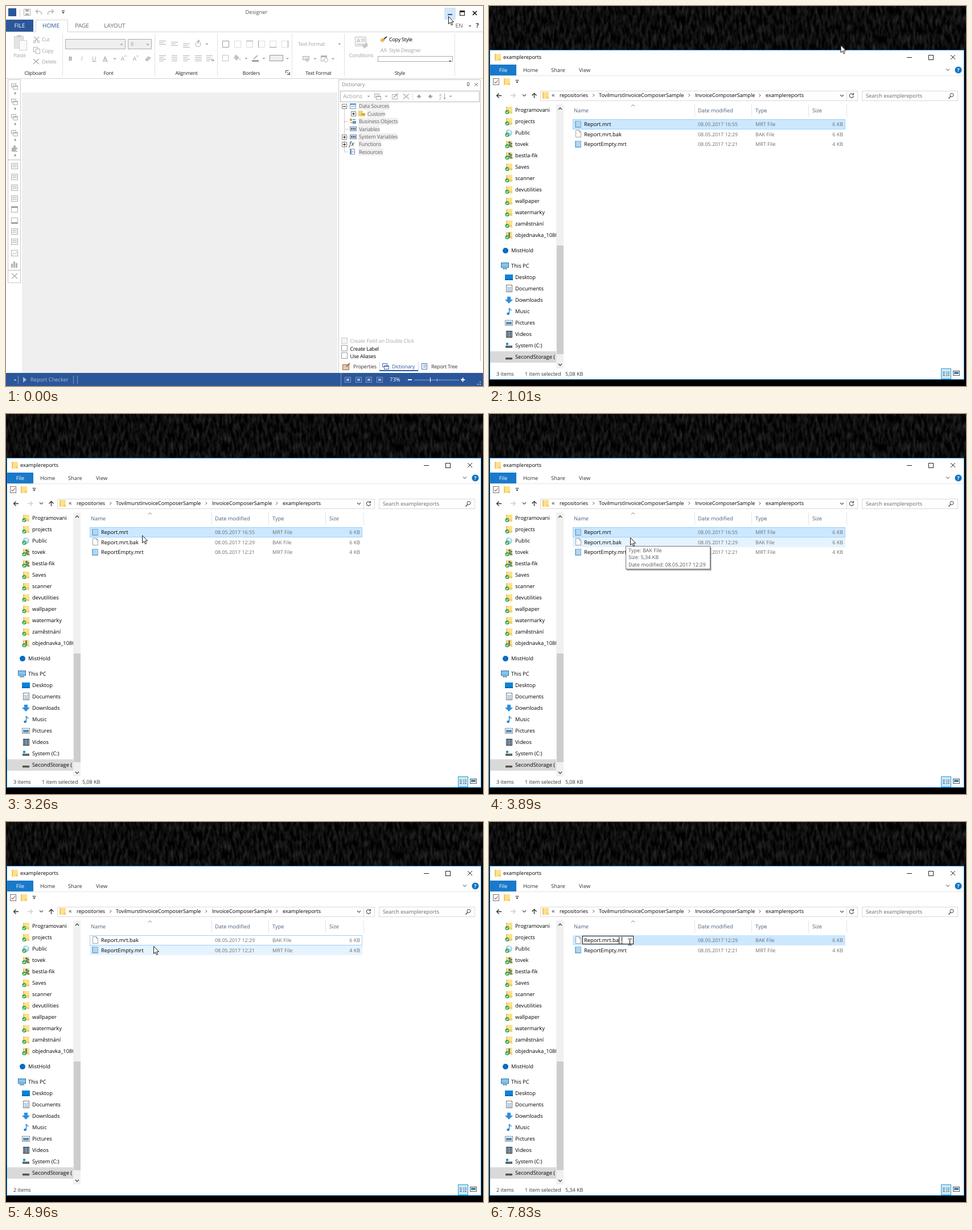
Write an HTML page that moves like this. It is 838 px wide and 668 px high and loops after 7.99 s.

```html
<!DOCTYPE html>
<html lang="en">
<head>
<meta charset="utf-8">
<title>Renaming a backup file</title>
<style>
html, body { margin: 0; width: 100%; height: 100%; overflow: hidden; background: #000; }
svg { position: absolute; left: 0; top: 0; width: 838px; height: 668px; overflow: hidden; }
text { font-family: "Open Sans", "Noto Sans", sans-serif; text-rendering: geometricPrecision; white-space: pre; }
#desk { will-change: transform; }
#win { overflow: visible; transform-origin: 0 0; }
#win .ui { letter-spacing: -.25px; }

/* Every animation shares one 7990 ms clock. */
#win, .pre, .post, #hover, #hoverTop, #sel, #picked, #edit, #field, #marked, #full, #gap, #short, #arrow, #beam {
  animation: 7990ms step-end infinite;
}
#win { animation-name: minimise; }
.pre { animation-name: pre; }
.post { animation-name: post; }
#hover { animation-name: hover; }
#hoverTop { animation-name: hover-top; }
#sel { animation-name: sel; }
#picked { animation-name: picked; }
#edit, #beam { animation-name: edit; }
#field { animation-name: field; }
#marked { animation-name: marked; }
#full { animation-name: full; }
#gap { animation-name: gap; }
#short { animation-name: short; }
#arrow { animation-name: arrow; }
#tip { animation: tip 7990ms linear infinite; }
#mover { animation: move 7990ms linear infinite; }

@keyframes minimise {
  0% { opacity: 1; transform: none; }
  6.88% { opacity: .85; transform: translate(1px, 52px) scale(.94); }
  7.76% { opacity: .55; transform: translate(4px, 183px) scale(.788); }
  9.01% { opacity: .14; transform: translate(8px, 350px) scale(.62); }
  9.89%, to { opacity: 0; transform: translate(12px, 480px) scale(.5); }
}
@keyframes pre { 0% { visibility: visible; } 53.44%, to { visibility: hidden; } }
@keyframes post { 0% { visibility: hidden; } 53.44%, to { visibility: visible; } }
@keyframes hover {
  0% { visibility: hidden; } 21.9% { visibility: visible; }
  28.29% { visibility: hidden; } 41.68% { visibility: visible; }
  63.2%, to { visibility: hidden; }
}
@keyframes hover-top { 0% { visibility: hidden; } 63.2% { visibility: visible; } 66.08%, to { visibility: hidden; } }
@keyframes sel {
  0% { visibility: hidden; stroke: #99d1ff; }
  66.08% { visibility: visible; stroke: #99d1ff; }
  82.6%, to { visibility: visible; stroke: #cce8ff; }
}
@keyframes picked { 0% { visibility: hidden; } 69.34%, to { visibility: visible; } }
@keyframes edit { 0% { visibility: hidden; } 82.6%, to { visibility: visible; } }
@keyframes field { 0% { width: 95px; } 98%, to { width: 89px; } }
@keyframes marked { 0% { opacity: 1; } 89.11%, to { opacity: 0; } }
@keyframes full { 0% { opacity: 0; } 89.11% { opacity: 1; } 98%, to { opacity: 0; } }
@keyframes gap { 0% { opacity: 0; } 95.12%, to { opacity: 1; } }
@keyframes short { 0% { opacity: 0; } 98%, to { opacity: 1; } }
@keyframes arrow { 0% { visibility: visible; } 82.6%, to { visibility: hidden; } }
@keyframes tip { 0%, 46.06% { opacity: 0; } 47.81%, 57.32% { opacity: 1; } 58.82%, to { opacity: 0; } }
@keyframes move {
  0%, .88% { transform: translate(777px, 18px); }
  2.13%, 9.89% { transform: translate(778.5px, 17px); animation-timing-function: ease-in-out; }
  16.52% { transform: translate(330px, 160px); }
  19.4% { transform: translate(262px, 200px); }
  21.9% { transform: translate(235px, 218px); }
  23.28%, 28.29% { transform: translate(228px, 225px); }
  29.16%, 39.92% { transform: translate(238px, 215px); }
  40.8% { transform: translate(239px, 213px); }
  42.55% { transform: translate(242px, 217px); }
  48.69%, 57.32% { transform: translate(248px, 217px); }
  62.08% { transform: translate(259px, 218px); }
  63.2% { transform: translate(258px, 214px); }
  64.08%, 78.4% { transform: translate(257px, 211px); }
  78.6%, 80.48% { transform: translate(257px, 212px); }
  80.6%, to { transform: translate(248px, 210px); }
}
</style>
</head>
<body>
<svg id="desk">
  <filter id="grunge" x="0" y="0" width="1" height="1" color-interpolation-filters="sRGB">
    <feTurbulence type="fractalNoise" baseFrequency=".2 .06" numOctaves="4" seed="7"/>
    <feColorMatrix values=".3 0 0 0 -.1  .3 0 0 0 -.1  .3 0 0 0 -.1  0 0 0 0 1"/>
  </filter>
  <rect width="838" height="78" filter="url(#grunge)"/>
</svg>
<svg id="files"></svg>
<svg id="win"></svg>
<svg id="pointer">
  <g id="mover"><path id="arrow" d="M.5.5V13.5L3.5 10.7 5.6 15.6 7.6 14.7 5.6 10H9.6Z" fill="#fff" stroke="#000" stroke-width=".9"/></g>
  <path id="beam" d="M244.5 205.5h2l1 1 1-1h2M247.5 206.5v9M244.5 216.5h2l1-1 1 1h2" fill="none" stroke="#000"/>
</svg>
<script>
// Baselines sit on whole pixels to keep small text crisp.
const text = (x, y, s, fill = '#000', size = 9.3, more = '') =>
  `<text x="${x}" y="${Math.round(y + 3.4)}" fill="${fill}" font-size="${size}" ${more}>${s}</text>`;
const rect = (x, y, w, h, fill, more = '') =>
  `<rect x="${x}" y="${y}" width="${w}" height="${h}" fill="${fill}" ${more}/>`;
const box = (x, y, w, h, stroke, fill = 'none', more = '') =>
  rect(x + .5, y + .5, w - 1, h - 1, fill, `stroke="${stroke}" ${more}`);
const line = (d, stroke, width = 1, fill = 'none') =>
  `<path d="${d}" stroke="${stroke}" stroke-width="${width}" fill="${fill}"/>`;
const shape = (d, fill) => `<path d="${d}" fill="${fill}"/>`;
const dot = (x, y, r, fill, more = '') => `<circle cx="${x}" cy="${y}" r="${r}" fill="${fill}" ${more}/>`;
const tri = (x, y, fill = '#999', s = 2.5) => shape(`M${x - s} ${y - s / 2}h${2 * s}l${-s} ${s}z`, fill);
const group = (attr, s) => `<g ${attr}>${s}</g>`;
const each = (list, fn) => list.map(fn).join('');
const mid = 'text-anchor="middle"', end = 'text-anchor="end"';

/* File window */
const folder = (x, y) => rect(x, y + 1, 11, 12, '#ffe08c') + rect(x, y + 1, 2, 12, '#f2c55c') + rect(x + 7, y + 9, 4, 4, '#f6cf6e');
const tick = (x, y) => dot(x, y, 3.6, '#35a443') + line(`M${x - 1.8} ${y}l1.4 1.4 2.3-2.7`, '#fff', 1.1);
const page = (x, y) => shape(`M${x} ${y}h7l3 3v10h-10z`, '#fff') + line(`M${x + .5} ${y + .5}h6l3 3v9h-9zM${x + 6.5} ${y + .5}v3h3`, '#888', .8);
const report = (x, y) => rect(x, y + 1, 11, 12, '#78b2dc') + rect(x + 2, y + 2, 8, 9, '#b5d6ee');
const chevron = (x, y, c = '#555') => line(`M${x - 1.5} ${y - 2.5}l2.5 2.5-2.5 2.5`, c);
const down = (x, y, c = '#555') => line(`M${x - 3} ${y - 1.5}l3 3 3-3`, c, 1.2);

const fileRow = (y, name, time, type, size, icon) =>
  icon(icon === page ? 152 : 151, Math.floor(y) - 7) + text(167, y, name) + text(367, y, '08.05.2017 ' + time, '#6d6d6d', 8.85) +
  text(468, y, type + ' File', '#6d6d6d', 9) + text(622, y, size + ' KB', '#6d6d6d', 9, end);
const bak = y => fileRow(y, 'Report.mrt.bak', '12:29', 'BAK', 6, page);
const empty = y => fileRow(y, 'ReportEmpty.mrt', '12:21', 'MRT', 4, report);

const places = ['Programovani', 'projects', 'Public', 'tovek', 'bestla-fik', 'Saves', 'scanner',
  'devutilities', 'wallpaper', 'watermarky', 'zaměstnání', 'objednavka_1080'];
const drives = ['Desktop', 'Documents', 'Downloads', 'Music', 'Pictures', 'Videos', 'System (C:)', 'SecondStorage ('];
const person = (x, y, c) => dot(x, y, 2, c) + shape(`M${x - 3} ${y + 6}q3-7 6 0z`, c);
const placeIcon = i => {
  const y = 176 + 20 * i;
  const base = i === 2 ? dot(35, y + 7, 6, '#a9d3e8') + dot(36, y + 5, 2.5, '#e3f1f8') : folder(30, y);
  return base + (i === 3 || i === 4 ? person(36, y + 4, '#476f98') + person(39, y + 6, '#6e8f56') : '') +
    (i === 11 ? rect(34, y + 2, 3, 9, '#777') : '') + tick(32, y + 10.5);
};
const driveIcons =
  rect(28, 472, 14, 10, '#0a84d8') + rect(28, 480, 14, 2, '#0567ad') +
  box(30, 490, 11, 13, '#777', '#fff') + line('M32 494.5h3M36 494.5h3M32 497.5h7M32 500.5h7', '#3b87bd') +
  shape('M32 511h6v5h4l-7 7-7-7h4z', '#2f8fe0') +
  line('M35.5 541v-10q1 3 4 4', '#2587d8', 1.4) + dot(33.5, 541, 2.3, '#2587d8') +
  box(28, 552, 14, 10, '#888', '#fff') + rect(30, 555, 10, 5, '#4f94c4') +
  rect(30, 571, 11, 12, '#333') + rect(33, 572, 5, 10, '#6d93b8') + line('M31.5 572v10M39.5 572v10', '#ddd', 1) +
  rect(29, 597, 12, 4, '#666') + rect(30, 592, 4, 4, '#1698e0') + rect(29, 618, 12, 3.5, '#555');

document.getElementById('files').innerHTML =
  box(1, 77, 834, 580, '#1883d7', '#fff') +
  folder(10, 83) + text(25, 90, 'examplereports', '#000', 9.1) +
  line('M734 90.5h9M811 86l8 8M819 86l-8 8', '#222') + box(772, 86, 9, 9, '#222') +
  rect(2, 103, 46, 19, '#1979ca') + text(25, 113, 'File', '#fff', 9.2, mid) +
  text(60, 113, 'Home', '#333') + text(109, 113, 'Share', '#333') + text(158, 113, 'View', '#333') +
  down(806, 112, '#888') + dot(824.5, 112.5, 6, '#0a72c4') + text(824.5, 112.5, '?', '#fff', 9, mid + ' font-weight="700"') +
  line('M2 122.5h832', '#e4e4e4') +
  box(7, 127, 11, 12, '#777', '#fff') + line('M9.5 133l2.2 2.5 4-5', '#a5463f', 1.1) + folder(26, 126) +
  line('M46.5 130.5h6', '#222') + tri(49.5, 134, '#222') +
  line('M22 157.5h-8M17.5 153.5l-4 4 4 4', '#333', 1.3) + line('M38 157.5h8M42.5 153.5l4 4-4 4', '#ccc', 1.3) +
  down(62, 157, '#555') + line('M79.5 162v-8M75.5 157.5l4-4 4 4', '#333', 1.3) +
  box(90, 149, 558, 18, '#d9d9d9') + line('M628.5 150v16', '#d9d9d9') + folder(94, 150) +
  text(110, 157, '«', '#333', 11) + text(124, 157, 'repositories', '#000', 9) + chevron(184, 157) +
  text(193, 157, 'TovilmurstInvoiceComposerSample', '#000', 9.1) + chevron(352, 157) +
  text(362, 157, 'InvoiceComposerSample', '#000', 9.1) + chevron(476, 157) + text(486, 157, 'examplereports', '#000', 9.1) +
  down(620, 157.5) + line('M639.5 155a3.6 3.6 0 1 0 1 3.2M640.5 153v3h-3', '#444', 1.1) +
  box(655, 149, 169, 18, '#d9d9d9') + text(662, 157.5, 'Search examplereports', '#666', 9.2) +
  line('M811 159l-3.5 3.5', '#444', 1.4) + dot(813, 156.5, 3, 'none', 'stroke="#444"') +
  line('M250 176.5l3-3 3 3', '#777') + line('M361.5 173v22M461.5 173v22M561.5 173v22M628.5 173v22', '#e3e3e3') +
  each([['Name', 149], ['Date modified', 367], ['Type', 468], ['Size', 568]], ([s, x]) => text(x, 183.5, s, '#4c607a')) +
  rect(2, 607, 116, 20, '#d9d9d9') +
  each(places, (s, i) => placeIcon(i) + text(46, 183 + 20 * i, s)) +
  dot(29, 430, 5, '#0a6cc2') + text(39, 430, 'MistHold') +
  box(21, 451, 14, 9, '#3c6e94', '#7cc6f2') + rect(24, 461, 8, 1.5, '#3c6e94') + text(39, 456.5, 'This PC') +
  driveIcons + each(drives, (s, i) => text(46, 477 + 20 * i, s)) +
  rect(118, 173, 20, 464, '#fff') + rect(118, 173, 13, 464, '#f0f0f0') + rect(119, 421, 12, 191, '#cdcdcd') +
  line('M122 182l3-3 3 3', '#444', 1.3) + line('M122 629l3 3 3-3', '#444', 1.3) +
  group('class="pre"', box(147, 199, 479, 18, '#99d1ff', '#cce8ff')) +
  rect(147, 217, 479, 17, '#e5f3ff', 'id="hover"') +
  group('class="post"', box(147, 199, 479, 18, '#99d1ff', '#fff')) +
  box(147, 199, 479, 18, '#99d1ff', '#e5f3ff', 'id="hoverTop"') +
  rect(147.5, 199.5, 478, 17, '#cce8ff', 'id="sel"') +
  group('class="pre"', fileRow(208, 'Report.mrt', '16:55', 'MRT', 6, report) + bak(225.5) + empty(243) +
    text(13, 647, '3 items', '#333', 9) + text(63, 647, '1 item selected', '#333', 9) + text(134, 647, '5,08 KB', '#333', 9)) +
  group('class="post"', bak(208) + empty(225.5) + text(13, 647, '2 items', '#333', 9)) +
  group('id="picked"', text(63, 647, '1 item selected', '#333', 9) + text(134, 647, '5,34 KB', '#333', 9)) +
  group('id="edit"',
    rect(164.5, 200.5, 95, 14, '#fff', 'id="field" stroke="#111"') +
    group('id="marked"', rect(167, 202, 48, 12, '#0078d7') + text(167, 208, '<tspan fill="#fff">Report.mrt</tspan>.bak')) +
    group('id="full"', text(167, 208, 'Report.mrt.bak') + line('M233.5 202v12', '#111')) +
    group('id="short"', text(167, 208, 'Report.mrt.ba') + line('M228.5 202v12M233.5 202v12', '#111')) +
    rect(233, 210, 1, 1, '#fff', 'id="gap"')) +
  group('id="tip"', rect(242, 235, 149, 41, '#000', 'opacity=".18"') + rect(241, 234, 149, 40, '#000', 'opacity=".3"') +
    box(240, 232, 149, 41, '#767676', '#fff') +
    text(245, 239.5, 'Type: BAK File', '#575757', 9.1) + text(245, 252, 'Size: 5,34 KB', '#575757', 9.1) +
    text(245, 264.5, 'Date modified: 08.05.2017 12:29', '#575757', 9)) +
  box(794, 637, 18, 19, '#26a0da', '#cbe8f6') + line('M797 643.5h4M797 646.5h4M797 649.5h4M803 643.5h2M806 643.5h3M803 646.5h2M806 646.5h3M803 649.5h2M806 649.5h3', '#456') +
  box(815, 641, 12, 9, '#555') + rect(817, 643, 8, 4, '#3f7fae');

/* Designer window */
const blue = '#2b579a', grey = '#b2b2b2', dim = '#a2a2a2', edge = '#d4d4d4';
const ui = (x, y, s, c = dim, z = 9, more = '') => text(x, y, s, c, z, 'class="ui" ' + more);
const lines = (x, y, widths, c = grey) => line(each(widths, (w, i) => `M${x} ${y + 3 * i + .5}h${w}`), c);
const sheet = (x, y, c = grey) => box(x - 6, y - 5, 12, 11, c, '#f6f6f6') + line(`M${x - 4} ${y - 1.5}h8M${x - 4} ${y + 1.5}h8`, c);
const stack = (x, y, c = grey) => box(x - 6, y - 5, 9, 7, c, '#f0f0f0') + box(x - 3, y - 1, 9, 7, c, '#fafafa') + rect(x - 3, y - 1, 9, 2, c);
const cross = (x, y, c = grey) => line(`M${x - 5} ${y - 5}l10 9M${x + 5} ${y - 5}l-10 9`, c, 1.6);

const quickBar =
  rect(4, 4, 14, 14, blue) + line('M24.5 5v14', edge) +
  box(31, 5, 12, 12, grey) + rect(34, 6, 6, 4, grey) + rect(34, 13, 6, 4, grey) +
  line('M53 9.5h6q5 1 3 6M56 6l-3.5 3.5 3.5 3.5M83 9.5h-6q-5 1-3 6M80 6l3.5 3.5-3.5 3.5', grey, 1.4) +
  line('M98 8.5h5', '#222') + tri(100.5, 12, '#222') + text(440, 11, 'Designer', '#555', 9.4, mid) +
  rect(770, 3, 20, 21, '#d3e6f8') + rect(776, 14, 8, 2, blue) +
  box(797, 8, 9, 9, '#111') + rect(797, 8, 9, 3, '#111') + line('M820 9l7 7M827 9l-7 7', '#111', 1.7);

const tabs =
  line('M0 45.5h52.5v-21h56v21H838', edge) + rect(0, 24, 48, 21, blue) +
  each([['FILE', 24, '#fff'], ['HOME', 79, blue], ['PAGE', 133.5, '#666'], ['LAYOUT', 191, '#666'], ['EN', 796, '#666']],
    ([s, x, c]) => text(x, 35, s, c, 10.1, mid)) +
  tri(815, 35.5, '#555') + text(828, 35, '?', '#333', 11, mid + ' font-weight="700"');

const clipFont =
  box(14, 53, 17, 22, '#d0d0d0', '#e4e4e4') + rect(19, 51, 8, 4, '#cfcfcf') + box(23, 60, 14, 18, '#d0d0d0', '#fafafa') +
  ui(24, 87, 'Paste', dim, 9, mid) + ui(63, 59, 'Cut') + ui(63, 78.5, 'Copy') + ui(63, 97.5, 'Delete') +
  line('M49 54l8 8M58 54l-8 8', grey, 1.2) + dot(50, 63, 2, 'none', 'stroke="#b2b2b2"') + dot(57, 63, 2, 'none', 'stroke="#b2b2b2"') +
  box(48, 72, 8, 9, grey, '#fff') + box(52, 75, 8, 9, grey, '#fff') + cross(53, 98) +
  box(104, 58, 106, 18, '#ababab', '#efefef') + tri(203, 68) + box(214, 58, 42, 18, '#ababab', '#efefef') + tri(249, 68) + ui(219, 67, '8') +
  each([['B', 113, 'font-weight="700"'], ['I', 133, 'font-style="italic"'], ['U', 155, 'text-decoration="underline"'],
    ['A', 174, 'font-weight="600"'], ['A', 205, ''], ['A', 226, '']], ([s, x, m]) => text(x, 92.5, s, dim, 10, mid + ' ' + m)) +
  rect(170, 96, 9, 2, '#ccc') + tri(191, 93) + line('M208 89l2-2 2 2M229 87l2 2 2-2', grey) + shape('M244 94l6-6 5 3-6 6h-3z', '#c4c4c4');

const aligning =
  lines(269, 61, [12, 8, 12]) + lines(290, 63, [12, 8, 12]) + lines(311, 66, [12, 8, 12]) +
  dot(337.5, 67, 4.5, 'none', 'stroke="#aaa"') + line('M337.5 67v-7l3 2', '#aaa', 1.2) + tri(353, 67) +
  each([269, 290, 311, 332], (x, i) => lines(x + (i === 1 ? 1 : 0), 87, i === 3 ? [12, 12, 12, 12] : i === 1 ? [10, 10, 10, 10] : [12, 8, 12, 8])) +
  lines(352, 87, [11, 8, 11, 6]) + line('M360 95.5h5M362.5 93l3 2.5-3 2.5', '#999');

const sides = ['M380.5 61.5h11v11h-11z', '', 'M422 61.5h12', 'M443.5 61v12', 'M463 72.5h12', 'M495.5 61v12'];
const borders =
  each(sides, (d, i) => box([380, 401, 422, 443, 463, 484][i], 61, 12, 12, '#dcdcdc') + (d ? line(d, '#999') : '')) +
  box(380, 86, 11, 11, '#c4c4c4') + shape('M400 91l5-5 5 5-5 5z', '#c4c4c4') + line('M403 90v-5M411 92v3', dim) + tri(422, 92.5) +
  line('M435 93l7-6', grey, 2) + rect(432, 95, 12, 3, '#8fa0b8') + tri(453, 92.5) + box(463, 86, 24, 11, '#999', '#efefef') + tri(494.5, 92.5) +
  line('M491.5 118v-4.5h5M494 116l4 4M498.5 116v4.5h-5', '#444');

const formats =
  ui(513, 67, 'Text Format') + tri(586, 67) + box(521, 88, 12, 7, grey, '#e8e8e8') + dot(529, 95, 3, '#ccc') + tri(543, 93) +
  box(553, 87, 11, 10, grey) + rect(553, 87, 11, 3, grey) + dot(562, 95, 3.5, '#fff', 'stroke="#b2b2b2"') + tri(574.5, 93) +
  box(613, 54, 20, 17, '#c4c4c4', '#f4f4f4') + text(619, 61, 'A', dim, 9, mid) + lines(624, 58, [7, 7]) + lines(616, 67, [14]) + shape('M626 69l8-5 2 6-7 5z', '#c8c8c8') +
  ui(624, 87, 'Conditions', dim, 9, mid) +
  shape('M657 60l5-4 4 4-5 4z', '#e8b54d') + line('M664 58l5-4', '#333', 2) + ui(673, 59, 'Copy Style', '#000') +
  text(658, 78, 'A', dim, 9, 'font-style="italic"') + text(663, 78, 'A', grey, 10) + ui(673, 78, 'Style Designer') +
  box(653, 88, 132, 10, '#ababab', '#fff') + tri(780, 97, '#222', 2);

const ribbon = clipFont + aligning + borders + formats +
  line('M0 127.5h838', edge) + line(each([99, 261, 371, 502, 594, 788], x => `M${x}.5 48v76`), '#e1e1e1') +
  each([['Clipboard', 51], ['Font', 180], ['Alignment', 317], ['Borders', 431], ['Text Format', 549], ['Style', 692]],
    ([s, x]) => ui(x, 118, s, '#222', 8.7, mid));

const toolIcons = [281, 300, 319, 338, 357, 377, 396, 414, 434];
const toolbox =
  box(3, 129, 23, 358, '#c8c8c8', '#fff') +
  each([141, 168, 195, 223], y => stack(15, y)) + shape('M10 249h3q-1-4 2-4t2 4h3v3q-3-1-3 1t3 1v2H10z', grey) +
  each([141, 168, 195, 223, 250], y => shape(`M15 ${y + 10}l3 2.5-3 2.5z`, '#888')) +
  each(toolIcons, (y, i) => i === 8 ? box(9, 429, 12, 11, grey) + line('M10 438l4-4 2 2 4-4', grey) :
    i === 4 || i === 5 ? box(9, y - 5, 12, 11, grey) + rect(9, i === 4 ? y - 5 : y + 3, 12, 3, dim) : sheet(15, y)) +
  line('M10.5 460v-7M14.5 460v-11M18.5 460v-8', grey, 3) + cross(15, 475) +
  line('M3 270.5h23M3 464.5h23', '#bbb');

const tree = [['Data Sources', 620, '#6f9cc8'], ['Custom', 635, '#edc35d'], ['Business Objects', 620, '#d89a4a'], ['Variables', 620, '#5f83b5'],
  ['System Variables', 620, '#5f83b5'], ['Functions', 620, ''], ['Resources', 620, '#7b96bd']];
const labelWidth = [55, 31, 69, 37, 68, 40, 44];
const rowY = i => 176 + 13.4 * i;
const plus = (x, y, open) => box(x - 4, y - 4, 9, 9, '#888', '#fff') + line(`M${x - 2} ${y + .5}h5` + (open ? '' : `M${x + .5} ${y - 2}v5`), '#222');
const treeIcon = (x, y, i, c) => i === 5 ? text(x - 1, y, 'fx', '#333', 11, 'font-style="italic"') :
  i === 1 ? rect(x, y - 5, 8, 10, '#f0d080') + rect(x + 5, y - 1, 7, 6, c) + line(`M${x + 5} ${y + 1.5}h7`, '#a97d22') :
  i === 2 ? rect(x, y - 5, 4, 4, c) + rect(x + 5, y - 1, 6, 5, '#6c93c4') + line(`M${x + 1} ${y + 2}h4M${x + 5} ${y - 3.5}h5`, '#666') :
  i === 3 || i === 4 ? box(x, y - 4, 12, 8, c, '#e6edf7') + line(`M${x + 2} ${y}h2M${x + 5} ${y}h2M${x + 8} ${y}h2`, '#345', 3) :
  box(x, y - 5, i ? 9 : 11, 10, c, '#fff') + rect(x, y - 5, i ? 3 : 11, i ? 10 : 3, c) + line(`M${x + 2} ${y + .5}h7`, c);

const panel =
  line('M584.5 645v-515.5h249V624', '#c8c8c8') + ui(590, 138, 'Dictionary', '#888') +
  line('M810 139.5h4M812 139v3M810.5 134.5h3v5h-3z', '#777') + line('M823 135l6 6M829 135l-6 6', '#777') +
  box(587, 149, 245, 20, '#b5b5b5', '#fff') + text(592, 159, 'Actions', dim, 10) + tri(637, 159) + stack(653, 159) + tri(668, 159) +
  box(678, 155, 10, 9, grey) + line('M681 161l7-7', dim, 1.6) + cross(703, 159.5) + line('M714.5 152v14', '#ddd') +
  shape('M721 160h9l-4.5-4.5zM724 160h3v2h-3zM741 158h9l-4.5 4.5zM744 156h3v2h-3z', dim) +
  text(761, 156, 'A', dim, 7) + text(761, 162, 'Z', dim, 7) + line('M770.5 154v9M768 161l2.5 3 2.5-3', dim) + tri(781, 159) +
  `<path d="M594.5 176v81M594 176.5h8M594 203.5h8M594 216.5h8M594 230.5h8M594 243.5h8M594 256.5h8M610 189.5h8" stroke="#999" stroke-dasharray="1 1" fill="none"/>` +
  plus(594, 176, true) + plus(610, 189) + plus(594, 230) + plus(594, 243) +
  each(tree, ([s, x, c], i) => rect(x - 1, rowY(i) - 6, labelWidth[i], 12.4, '#efefef') +
    treeIcon(x - 16, Math.round(rowY(i)), i, c) + ui(x, rowY(i), s, '#666', 9.2)) +
  each([['Create Field on Double Click', '#aaa'], ['Create Label', '#000'], ['Use Aliases', '#000']], ([s, c], i) =>
    box(589, Math.round(583 + 13.2 * i), 11, 11, i ? '#999' : '#ccc', i ? '#fff' : '#f4f4f4') + ui(604.5, 589 + 13.3 * i, s, c, 9.2)) +
  rect(591, 630, 11, 9, '#e3cba4') + box(591, 630, 12, 10, '#8b7355') + line('M598 634l6-6', '#c2603a', 2) + ui(610, 634, 'Properties', '#333') +
  line('M656.5 625v16M724.5 625v16', edge) + rect(656, 640, 68, 2, blue) + stack(667, 633, '#4672ae') + ui(678, 634, 'Dictionary', blue) +
  box(730, 628, 10, 11, '#4672ae', '#fff') + line('M733 631.5h5M733 634.5h5', '#4672ae') + ui(747, 634, 'Report Tree', '#333');

const pale = '#a8bbd9';
const statusBar =
  rect(0, 645, 838, 23, blue) + shape('M13.5 658.5h5l-2.5-3z', pale) + shape('M30 652l6 5-6 5z', pale) +
  line('M21.5 650v14M118.5 650v14M125.5 650v14M588.5 645v23', '#7f9ac6') + text(43, 657, 'Report Checker', pale, 9.3) +
  each([600, 619, 637, 656], x => box(x - 5, 652, 11, 10, '#7f9ac6') + rect(x - 2, 655, 5, 4, '#9fb5d8')) +
  text(674, 657, '73%', '#fff', 9.5) + rect(706, 656, 7, 2, '#fff') + line('M717 657.5h79', '#8aa6d4') +
  line('M745.5 653v8', '#fff') + line('M757.5 655v5', pale) + line('M799 657h7M802.5 653.5v7', '#fff', 2) +
  each([[832, 664], [828, 664], [832, 660]], ([x, y]) => rect(x, y, 2, 2, pale));

document.getElementById('win').innerHTML =
  rect(-1, -1, 840, 670, '#fff', 'stroke="#1769a8" stroke-width="1.5"') + rect(28, 152, 554, 493, '#efefef') +
  quickBar + tabs + ribbon + toolbox + panel + statusBar;
</script>
</body>
</html>
```
